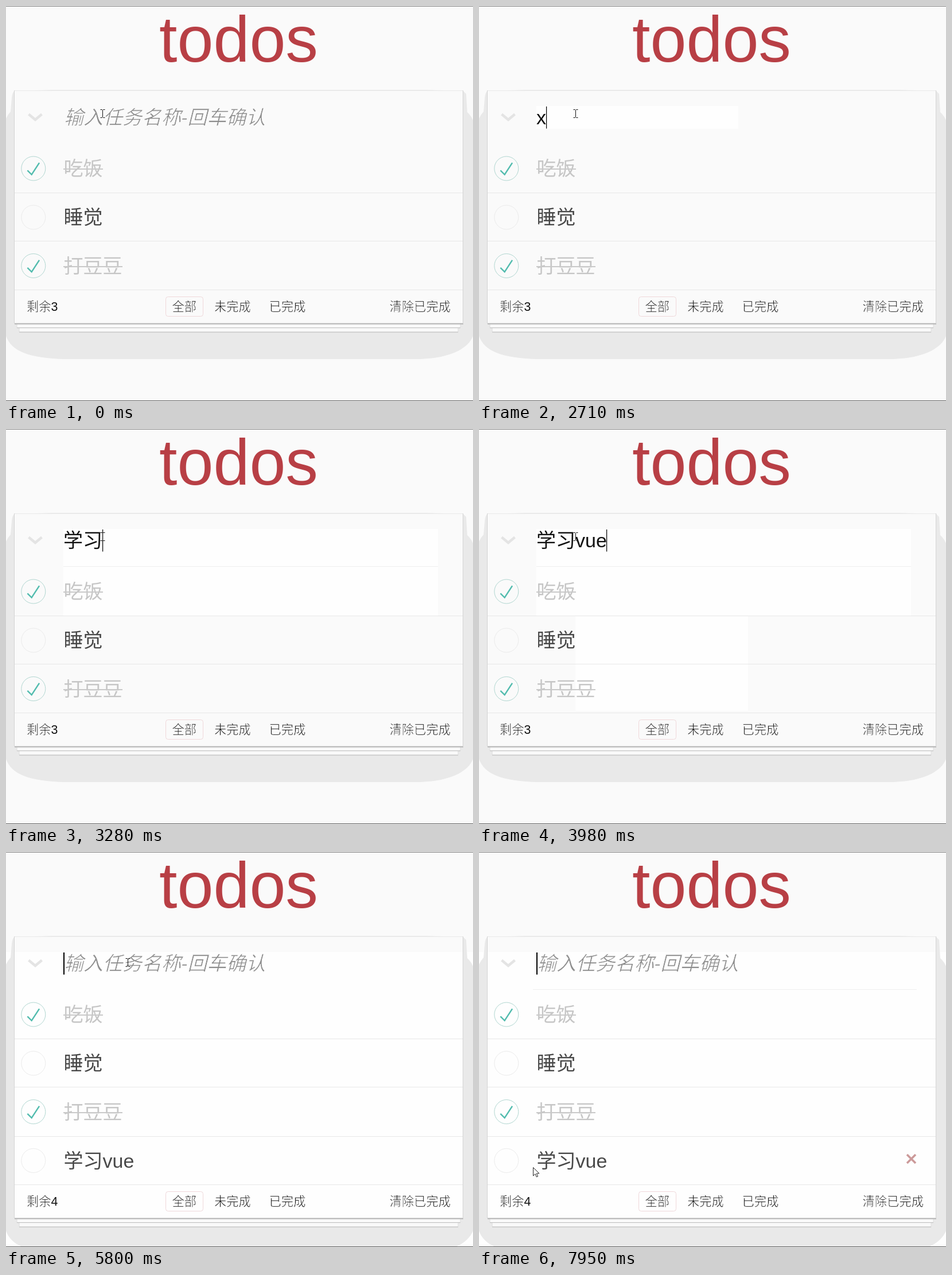
Write an HTML page that moves like this. It is 814x688 px and loops after 8000 ms.

```html
<!DOCTYPE html>
<html lang="zh-CN">
<head>
<meta charset="utf-8">
<title>todos</title>
<style>
  html, body { margin: 0; width: 100%; height: 100%; overflow: hidden; background: #fafafa; }
  svg { display: block; width: 814px; height: 688px; }
  text { font-family: "Liberation Sans", "Noto Sans CJK SC", "Noto Sans CJK", sans-serif; white-space: pre; }
  .title { font-size: 113.2px; fill: #b83f45; text-anchor: middle; }
  .input { font-size: 34px; fill: #111; }
  .hint { font-style: italic; fill: #8c8c8c; }
  .label { font-size: 34px; fill: #484848; }
  .done .label { fill: #c6c6c6; }
  .foot text { font-size: 21.3px; fill: #111; }
  /* a paper-coloured outline gives the light weight */
  .hint, .foot text { stroke: #fcfcfc; stroke-width: .7px; }
  .foot tspan { stroke: none; }
  .rule { stroke: #e8e8e8; }
  .popup rect { fill: #fff; stroke: #d9d9d9; }
  .popup text { font-size: 22px; fill: #333; }
</style>
</head>
<body>
<svg viewBox="0 0 814 688" id="stage">
  <rect width="814" height="688" fill="#fafafa"/>
  <rect id="paper" y="174" width="814" height="514" fill="#fefefe"/>
  <path id="shade" fill="#e9e9e9"/>
  <text class="title" x="405.5" y="97">todos</text>
  <g id="sheets"></g>
  <rect id="card" x="14.5" y="147.5" width="782" fill="#fafafa" stroke="#d4d4d4"/>
  <path d="M15 147.5H796" stroke="#e9e9e9"/>
  <g id="patches" fill="#fefefe"></g>
  <path id="inputLine" stroke="#efefef"/>
  <path d="M39.5 188.5 51 198 62.5 188.5" fill="none" stroke="#e4e4e4" stroke-width="4.5"/>
  <text id="hint" class="input hint" x="101" y="206">输入任务名称-回车确认</text>
  <text id="typed" class="input" x="100" y="206"></text>
  <g id="rows"></g>
  <g id="foot" class="foot">
    <path class="rule" d="M15 494.5H796"/>
    <rect x="278.5" y="506.5" width="65" height="34" rx="4" fill="none" stroke="#efd8da"/>
    <text x="36" y="531">剩余<tspan id="left">3</tspan></text>
    <text x="289.5" y="531">全部</text>
    <text x="363" y="531">未完成</text>
    <text x="458.5" y="531">已完成</text>
    <text x="668.5" y="531">清除已完成</text>
  </g>
  <path id="remove" d="M-7.5-7.5 7.5 7.5M7.5-7.5-7.5 7.5" stroke="#cc9a9a" stroke-width="3.6"/>
  <g id="popup" class="popup"></g>
  <rect id="caret" y="175" height="38.5" fill="#000"/>
  <path id="beam" d="M-4-7h3l1 1 1-1h3M0-6V6M-4 7h3l1-1 1 1h3" fill="none" stroke="#111"/>
  <path id="arrow" d="M.5.5V15l3.5-3.3 2.3 5.3 2.3-1-2.3-5.1H11z" fill="#fff" stroke="#222"/>
  <path d="M0 .5H814" stroke="#858585"/>
  <path d="M0 687.5H814" stroke="#606060"/>
</svg>
<script>
const LOOP = 8000, GROW = 85;
const $ = id => document.getElementById(id);
const show = (el, on) => el.setAttribute('display', on ? 'inline' : 'none');
const move = (el, x, y) => el.setAttribute('transform', `translate(${x} ${y})`);

// Rows: label, done, centre, rule below, width of the strike
const tasks = [
  ['吃饭', true, 283, 325.5, 69],
  ['睡觉', false, 368, 409.5],
  ['打豆豆', true, 452.5, 0, 103],
  ['学习vue', false, 537.5, 495.5]
];
const TICK = 'M72 25 42 71 27 56l-4 4 20 20 34-52z';

$('rows').innerHTML = tasks.map(([name, done, y, rule, w]) => `
  <g class="${done ? 'done' : ''}">
    <circle cx="47.8" cy="${y}" r="21" fill="none" stroke="${done ? '#b0d6d0' : '#ebebeb'}"/>
    ${done ? `<path d="${TICK}" fill="#52bcae" transform="translate(26.9 ${y - 20.9}) scale(.418)"/>` : ''}
    <text class="label" x="100.5" y="${y + 12}">${name}</text>
    ${done ? `<path d="M100 ${Math.round(y) + 1}h${w}" stroke="#c9c9c9" stroke-width="2"/>` : ''}
    ${rule ? `<path class="rule" d="M15 ${rule}H796"/>` : ''}
  </g>`).join('');

$('sheets').innerHTML = [[23, 788, 568], [19, 792, 560.5]].map(([a, b, y]) => `
  <path d="M${a} 540H${b}V${y}H${a}z" fill="#f9f9f9" stroke="#dedede"/>
  <path d="M${a} ${y}H${b}" stroke="#bcbcbc"/>`).join('')
  + '<path d="M15 553.5H797" stroke="#b4b4b4" stroke-width="2"/>';

const shadePath = d => `M85 146H728L797 148 802 153 804 185Q810 190 814 199V${575 + d}
  C805 ${597 + d} 775 ${614 + d} 715 ${615 + d}H105C38 ${614 + d} 9 ${600 + d} 0 ${575 + d}
  V196Q4 188 8 184L10 160Q11 150 15 148z`;

// Candidate windows: left, right, bottom, lines of text
const popups = {
  xu: [100, 652, 326, ['xu', '1.需  2.许  3.须  4.虚  5.续']],
  xue: [100, 652, 326, ['xue', '1.学  2.雪  3.血  4.穴  5.靴']],
  xuexi: [100, 753, 326, ["xue'xi", '1.学习  2.学戏  3.血洗  4.学系  5.血希']],
  v: [168, 469, 491, ['v', '1.数字转换', '2.日期转换', '3.算式计算', '4.函数计算']],
  vue: [168, 469, 326, ['vue', '1.vue']]
};

function popupMarkup([a, b, bottom, lines]) {
  const gap = lines.length > 2 ? 47 : 38;
  return `<rect x="${a + .5}" y="239.5" width="${b - a - 1}" height="${bottom - 240}"/>`
    + lines.map((s, i) => `<text x="${a + 12}" y="${269 + i * gap}">${s}</text>`).join('');
}

const input = [100, 174, 352, 40], narrow = [100, 174, 552, 152],
      wide = [100, 174, 653, 152], tall = [168, 326, 301, 165],
      sheet = [15, 174, 781, 463];

// Each step changes only what it names
const steps = [
  [0, { text: '', caret: false, popup: '', count: 3, hover: 0, line: null, patches: [], beam: true, mouse: [168.5, 187.5] }],
  [500, { caret: true }],
  [1090, { caret: false }],
  [1490, { caret: true }],
  [2050, { caret: false }],
  [2580, { caret: true }],
  [2710, { text: 'x', patches: [input] }],
  [2860, { text: 'xu', popup: 'xu', patches: [narrow] }],
  [3020, { text: 'xue', popup: 'xue' }],
  [3160, { text: 'xuexi', popup: 'xuexi', patches: [wide] }],
  [3280, { text: '学习', popup: '', line: [100, 753] }],
  [3710, { text: '学习v', popup: 'v', patches: [wide, tall] }],
  [3860, { text: '学习vue', popup: 'vue' }],
  [3980, { popup: '' }],
  [4570, { caret: false }],
  [5130, { caret: true }],
  [5250, { mouse: [212.5, 192.5] }],
  [5680, { caret: false }],
  [5800, { text: '', caret: true, count: 4, line: null, patches: [sheet] }],
  [6360, { caret: false }],
  [6920, { caret: true }],
  [7040, { beam: false, mouse: [211, 300], hover: 1, line: [100, 763] }],
  [7160, { mouse: [213, 471], hover: 3 }],
  [7310, { mouse: [217, 541], hover: 4 }],
  [7430, { mouse: [221, 553], caret: false }],
  [7710, { mouse: [219, 556] }],
  [7830, { mouse: [140, 555] }],
  [7950, { mouse: [94, 549], caret: true, line: [94, 763] }]
];

function draw(s) {
  const extra = s.count > 3, grow = extra ? GROW : 0;
  show($('paper'), extra);
  $('shade').setAttribute('d', shadePath(grow));
  $('card').setAttribute('height', 405 + grow);
  move($('sheets'), 0, grow);
  move($('foot'), 0, grow);
  show($('rows').lastElementChild, extra);
  $('left').textContent = s.count;
  $('patches').innerHTML = s.patches.map(([x, y, w, h]) =>
    `<rect x="${x}" y="${y}" width="${w}" height="${h}"/>`).join('');

  show($('inputLine'), s.line);
  if (s.line) $('inputLine').setAttribute('d', `M${s.line[0]} 239.5H${s.line[1]}`);

  const typed = $('typed');
  typed.textContent = s.text;
  show($('hint'), !s.text);
  const end = s.text ? Math.floor(100 + typed.getComputedTextLength()) : 100;
  $('caret').setAttribute('x', end);
  $('caret').setAttribute('width', s.text ? 1.2 : 2);
  show($('caret'), s.caret);

  $('popup').innerHTML = s.popup ? popupMarkup(popups[s.popup]) : '';
  show($('remove'), s.hover);
  if (s.hover) move($('remove'), 753.5, tasks[s.hover - 1][2] - 3);

  show($('beam'), s.beam);
  show($('arrow'), !s.beam);
  move(s.beam ? $('beam') : $('arrow'), ...s.mouse);
}

let last = -1;
const start = performance.now();
function tick() {
  const t = Math.max(0, performance.now() - start) % LOOP;
  const n = steps.filter(([at]) => at <= t).length;
  if (n !== last) {
    last = n;
    draw(Object.assign({}, ...steps.slice(0, n).map(step => step[1])));
  }
  requestAnimationFrame(tick);
}
tick();
</script>
</body>
</html>
```
